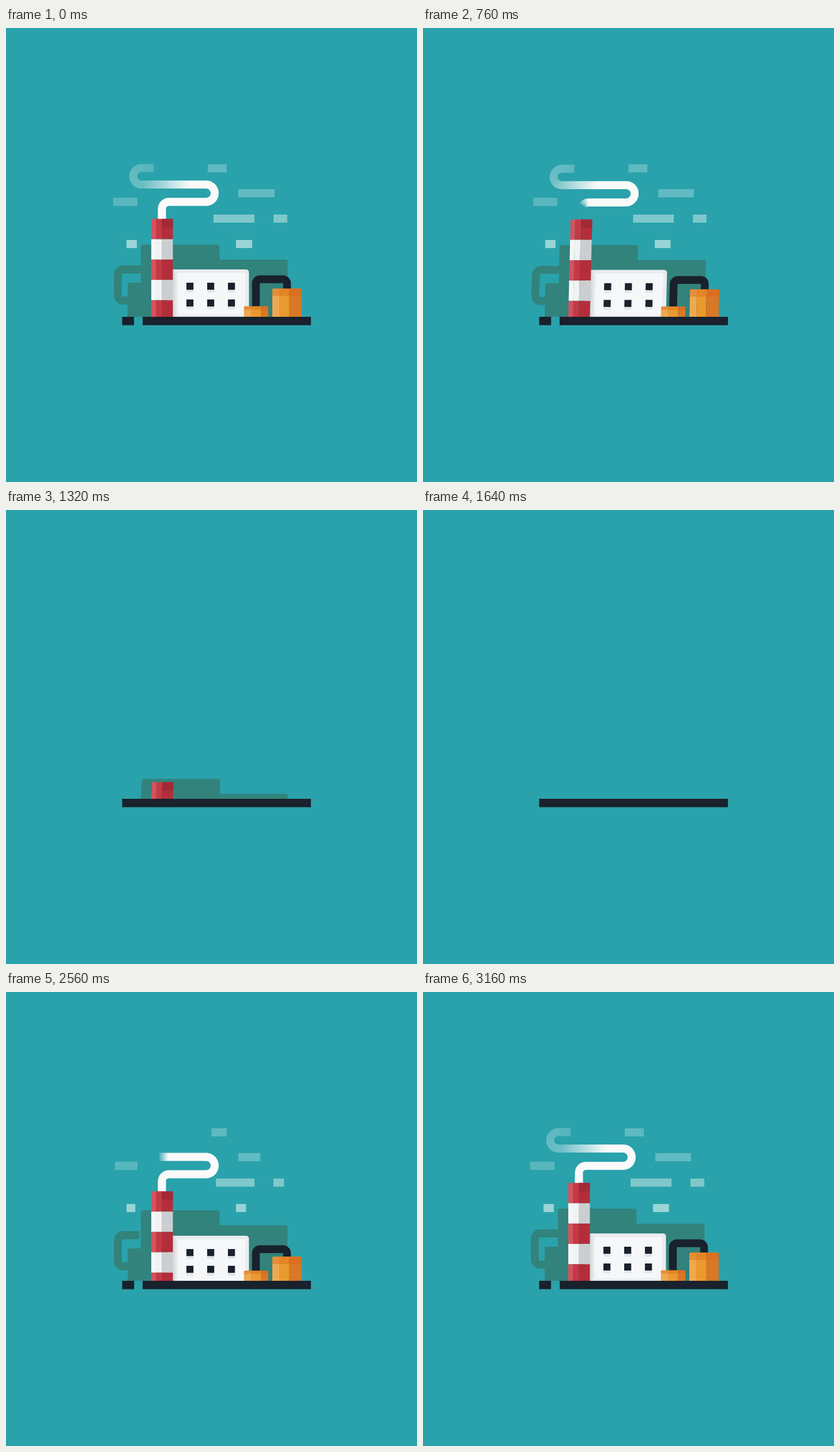
An HTML page with a canvas that plays this animation: 713x786 px, repeating every 3.88 s.

```html
<!DOCTYPE html>
<html lang="en">
<head>
<meta charset="utf-8">
<title>Factory</title>
<style>
html, body { margin: 0; width: 100%; height: 100%; overflow: hidden; background: #2aa2ab; }
canvas { display: block; }
</style>
</head>
<body>
<canvas id="stage" width="713" height="786"></canvas>
<script>
const ctx = document.getElementById('stage').getContext('2d');
const LOOP = 3880, STEP = 40, FALL = 680, RISE = 1960, FLOOR = 500;
const SKY = [42, 162, 171], GREEN = '#32837c', DARK = '#19212c';

const clamp = (v, lo = 0, hi = 1) => Math.min(hi, Math.max(lo, v));
const lerp = (a, b, u) => a + (b - a) * u;

// height: full travel, drop: travel 320 ms into the fall, start/time: rise
const parts = {
  green:   { height: 125, drop: 18,  start: 1958, time: 846 },
  gap:     { height: 15,  drop: 4,   start: 1958, time: 846 },
  duct:    { height: 1,   drop: .45, start: 2100, time: 780 },
  chimney: { height: 170, drop: 28,  start: 1994, time: 1011 },
  hall:    { height: 83,  drop: 17,  start: 2071, time: 769 },
  pipe:    { height: 73,  drop: 32,  start: 2140, time: 875 },
  tank:    { height: 50,  drop: 30,  start: 2140, time: 875 },
  box:     { height: 19,  drop: 10,  start: 2120, time: 680 }
};

// left, right, top, opacity, fixed end, loss in the fall, rise start, rise time
const clouds = [
  [350, 383, 236, .27, 'r', .36, 2120, 800],
  [403, 466, 279, .29, 'l', .60, 2115, 1200],
  [186, 228, 294, .24, 'r', .21, 2105, 620],
  [360, 431, 323, .44, 'r', .17, 2075, 640],
  [464, 488, 323, .44, 'l', .37, 2105, 900],
  [209, 227, 367, .58, 'l', .33, 2105, 740],
  [399, 427, 367, .58, 'l', .54, 2105, 1180]
];

// x, y, sideways slip, turn in degrees
const panes = [
  [313, 441, 0, 4], [349, 441, -1, 2], [385, 441, 0, 4],
  [313, 470, -3, 5], [349, 470, -3, 6], [385, 470, 5, 20]
];

const SMOKE_LEN = 328;
const smokePath = new Path2D();
smokePath.moveTo(270.5, 331);
smokePath.lineTo(270.5, 313);
smokePath.arcTo(270.5, 301, 282, 301, 12);
smokePath.lineTo(347, 301);
smokePath.arc(347, 286, 15, Math.PI / 2, -Math.PI / 2, true);
smokePath.lineTo(235, 271);
smokePath.arc(235, 256.75, 14.25, Math.PI / 2, Math.PI * 1.5);
smokePath.lineTo(257, 242.5);

const DUCT_LEN = 105;
const ductPath = new Path2D();
ductPath.moveTo(213, 472);
ductPath.lineTo(204, 472);
ductPath.arcTo(194, 472, 194, 462, 9);
ductPath.lineTo(194, 428);
ductPath.arcTo(194, 418, 204, 418, 9);
ductPath.lineTo(236, 418);

const pipePath = new Path2D();
pipePath.moveTo(433.5, 580);
pipePath.lineTo(433.5, 442);
pipePath.arcTo(433.5, 435, 441, 435, 7);
pipePath.lineTo(481, 435);
pipePath.arcTo(487.5, 435, 487.5, 442, 7);
pipePath.lineTo(487.5, 580);

function sunk(name, t) {
  const p = parts[name];
  if (t < FALL) return 0;
  if (t < RISE) return Math.min(p.height, p.drop * ((t - FALL) / 320) ** 2.33);
  return p.height * (1 - clamp((t - p.start) / p.time)) ** 3;
}

function rect(color, x1, y1, x2, y2, r = 0) {
  ctx.fillStyle = color;
  ctx.beginPath();
  ctx.roundRect(x1, y1, x2 - x1, y2 - y1, r);
  ctx.fill();
}

function lowered(dy, draw) {
  ctx.save();
  ctx.translate(0, dy);
  draw();
  ctx.restore();
}

function stroke(path, color, width, from, to) {
  ctx.strokeStyle = color;
  ctx.lineWidth = width;
  ctx.setLineDash(to === undefined ? [] : [Math.max(0, to - from), 9999]);
  ctx.lineDashOffset = -(from || 0);
  ctx.stroke(path);
  ctx.setLineDash([]);
}

function drawClouds(t) {
  for (const [l, r, y, alpha, end, loss, start, time] of clouds) {
    const full = t < RISE
      ? 1 - loss * (Math.max(0, t - 640) / 360) ** 3
      : 1 - (1 - clamp((t - start) / time)) ** 2;
    const w = (r - l) * clamp(full);
    if (w <= 0) continue;
    const x = end === 'l' ? l : r - w;
    rect(`rgba(235,248,246,${alpha})`, x, y, x + w, y + 14);
  }
}

function drawSmoke(t) {
  let tail = 0, head = SMOKE_LEN, fade = 175;
  if (t < RISE) {
    const u = Math.max(0, t - 640) / 360;
    tail = 183 * u ** 1.8;
    fade += 65 * clamp(u);
  } else {
    head *= 1 - (1 - clamp((t - 2200) / 800)) ** 2;
    fade = lerp(225, 175, clamp((t - 2560) / 440));
  }
  for (let s = tail; s < head; s += 2) {
    let a = s < fade ? 1 : s < fade + 80
      ? lerp(1, .32, (s - fade) / 80)
      : lerp(.32, .2, (s - fade - 80) / 75);
    a *= clamp((head - s + 2) / (head < SMOKE_LEN ? 18 : 8));
    if (tail > 0) a *= clamp((s - tail + 4) / 14);
    const rgb = SKY.map(c => Math.round(lerp(c, 250, a)));
    stroke(smokePath, `rgb(${rgb})`, 13.8, s, Math.min(s + 3, head));
  }
}

function drawGreen(t) {
  rect(GREEN, 234, 375, 370.5, 640, 4);
  rect(GREEN, 360, 401, 488.5, 640, 3);
  rect(GREEN, 211, 441, 240, 640, 3);
  stroke(ductPath, GREEN, 13.8, 0, DUCT_LEN * 1.05 * (1 - sunk('duct', t)));
}

function drawHall(t) {
  rect('#e8ecee', 280, 418, 421.5, 600, 5);
  rect('#f5f7f8', 296, 424, 415, 496);
  const shade = ctx.createLinearGradient(289, 0, 303, 0);
  shade.addColorStop(0, '#cfd4d7');
  shade.addColorStop(1, 'rgba(245,247,248,0)');
  rect(shade, 289, 419, 303, 600);
  const u = t < RISE ? (Math.max(0, t - FALL) / 320) ** 2 : 0;
  for (const [x, y, slip, turn] of panes) {
    rect('#e2e6e9', x, y + 12, x + 12, y + 17);
    ctx.save();
    ctx.translate(x + 6 + slip * u, y + 6);
    ctx.rotate(turn * u * Math.PI / 180);
    rect(DARK, -6, -6, 6.2, 6.2);
    ctx.restore();
  }
}

function drawChimney() {
  for (let i = 0; i < 5; i++) {
    const y = 330.5 + i * 35.2, end = y + 35.2;
    const tones = i % 2 ? ['#f5f6f7', '#f1f2f3', '#cbced1'] : ['#d4535e', '#c33a46', '#b32e3a'];
    rect(tones[0], 252, y, 260, end);
    rect(tones[1], 260, y, 270, end);
    rect(tones[2], 270, y, 289.5, end);
  }
  rect('#a12a36', 270, 330.5, 289.5, 345);
}

function drawTank(x1, xa, xb, x2, y, cap) {
  ctx.save();
  ctx.beginPath();
  ctx.roundRect(x1, y, x2 - x1, 100, 3);
  ctx.clip();
  rect('#f0a850', x1, y, xa, 600);
  rect('#e99a2e', xa, y, xb, 600);
  rect('#d97826', xb, y, x2, 600);
  rect('rgba(214,100,24,.4)', x1, y, x2, y + cap);
  ctx.restore();
}

function drawGround(t) {
  const half = (15 - sunk('gap', t)) / 2, mid = 229.6;
  if (half < .05) return rect(DARK, 201.5, FLOOR, 529, 514.5);
  rect(DARK, 201.5, FLOOR, mid - half, 514.5);
  rect(DARK, mid + half, FLOOR, 529, 514.5);
}

function draw(t) {
  rect(`rgb(${SKY})`, 0, 0, 713, 786);
  const lean = t < RISE ? Math.min(.05, .046 * (Math.max(0, t - 120) / 880) ** 2) : 0;
  ctx.save();
  ctx.beginPath();
  ctx.rect(0, 0, 713, FLOOR);
  ctx.clip();
  ctx.transform(1, 0, -lean, 1, lean * FLOOR, 0);
  drawClouds(t);
  lowered(sunk('green', t), () => drawGreen(t));
  lowered(sunk('chimney', t), () => drawSmoke(t));
  lowered(sunk('hall', t), () => drawHall(t));
  lowered(sunk('chimney', t), drawChimney);
  lowered(sunk('pipe', t), () => stroke(pipePath, DARK, 13.5));
  lowered(sunk('tank', t), () => drawTank(462, 474, 491, 513, 451, 13));
  lowered(sunk('box', t), () => drawTank(412.5, 425, 442, 455, 481.5, 6));
  ctx.restore();
  drawGround(t);
}

const begin = performance.now();
function tick() {
  const t = (performance.now() - begin) % LOOP;
  draw(Math.floor(t / STEP) * STEP);
  requestAnimationFrame(tick);
}
tick();
</script>
</body>
</html>
```
